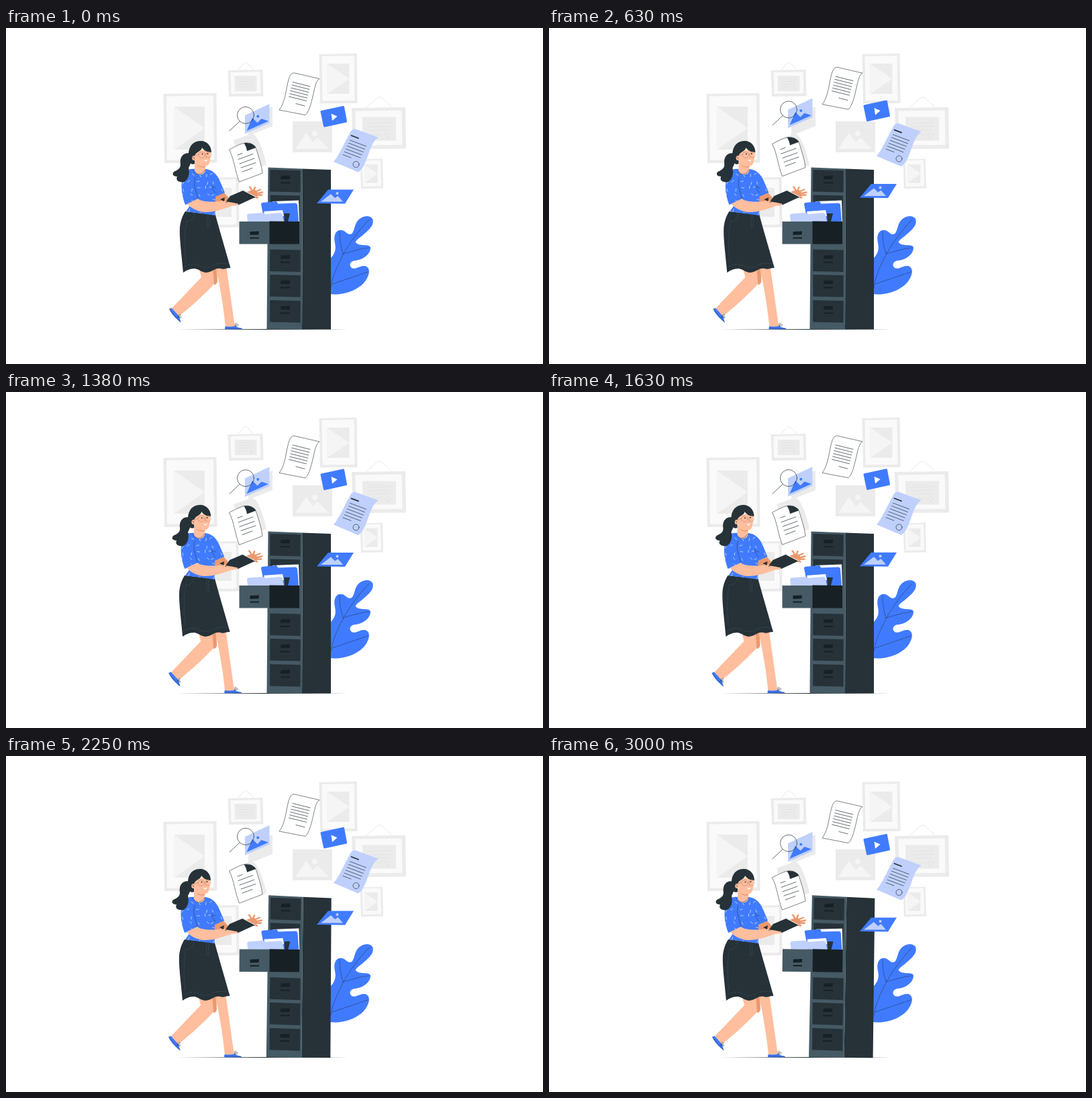
Write an HTML page that moves like this. It is 800 px wide and 500 px high and loops after 3040 ms.

```html
<!DOCTYPE html>
<html lang="en">
<head>
<meta charset="utf-8">
<title>Filing documents</title>
<style>
html, body { margin: 0; width: 100%; height: 100%; overflow: hidden; background: #fff; }
svg { display: block; width: 800px; height: 500px; }
.blue { fill: #407bff; }
.pale { fill: #bfd0fc; }
.dark { fill: #263238; }
.slate { fill: #455a64; }
.black { fill: #172025; }
.skin { fill: #ffbe9d; }
.tan { fill: #eb996e; }
.g1 { fill: #ebebeb; }
.g2 { fill: #f5f5f5; }
.g3 { fill: #fafafa; }
.white { fill: #fff; }
.line { fill: none; stroke: #263238; stroke-width: .7; stroke-linecap: round; stroke-linejoin: round; }
.thin { stroke-width: .5; }
.bold { stroke-width: 1.8; }
.faint { stroke: #e0e0e0; }
.soft { stroke: #455a64; stroke-width: .5; }
.sheet { fill: #fff; stroke: #263238; stroke-width: .6; stroke-linejoin: round; }
</style>
</head>
<body>
<svg viewBox="0 0 800 500">
  <defs>
    <clipPath id="shirtClip"><path d="M271 211C278 208 286 211 298 210C308 211 314 218 318 226L326 245L312 251L312 279L268 273L277 260L267 263C261 247 257 224 271 211Z"/></clipPath>
  </defs>

  <g id="wall"></g>
  <g>
    <path class="line faint" d="M346 62L353 54Q357 49 361 54L368 61M537 118Q545 112 553 104Q557 101 562 106L574 117"/>
    <path class="line faint" d="M346 76L368 75.5M346 80L368 79.5M348 84L366 83.5M346 88L358 87.5M539 142L573 141M539 147L573 146M543 152L569 151M539 159L558 158.5"/>
    <circle class="line faint" cx="365.5" cy="88.5" r="2"/>
    <circle class="line faint" cx="568.5" cy="159.5" r="3.5"/>
    <path class="g1" d="M427 139H486V185H427Z"/>
    <path class="g2" d="M431 180L447 156L457 170L464 163L481 180Z"/>
    <circle class="g2" cx="460" cy="157" r="4"/>
    <path class="g1" d="M361 133L397 117V146L361 160Z"/>
    <path class="g1" d="M339 167L367 157C375 160 383 181 388 204L354 216Z"/>
  </g>

  <path class="dark" d="M237 448.5L388 448.1L540 448.5L388 448.9Z"/>

  <path class="blue" d="M483 396C505 399 529 388 537 374C543 364 542 355 534 354C526 354 521 360 515 357C510 353 513 346 521 346C531 345 543 337 543 327C542 321 531 325 523 321C517 318 525 314 533 307C543 299 549 292 546 284C541 277 529 280 523 288C518 296 519 307 512 307C507 307 505 299 496 301C490 303 488 311 490 320C492 330 490 336 483 343Z"/>
  <path class="line thin" d="M484 386C487 364 505 322 541 285M497 303C497 316 499 326 502 336M502 336C514 333 528 328 541 327M486 381L539 363"/>

  <g id="cabinet">
    <path class="slate" d="M390.500 207.500L442 209.500L441 448.500H388.500Z"/>
    <path class="dark" d="M442 209.500L484 211V448.500H441Z"/>
    <path class="dark" d="M393.500 248.500L438 249.500L437 290H393.500Z"/>
    <path class="white" d="M397 258L436 256.500L437 288H397Z"/>
    <path class="blue" d="M380 262Q380 260.500 382 260L402 258Q404 258 405 261.500L431 260.500Q433.500 260.500 434 263L436 288H385Z"/>
    <path class="white" d="M384 273L412 271L414 280L386 280Z"/>
    <path class="dark" d="M414 276H423L420 288H415Z"/>
    <path class="pale" d="M359 279Q359 277 361 276.500L382 275Q384 275 386 277L408 275Q411 275 412 278L414 288H360Z"/>
    <g id="drawers"></g>
    <path class="slate" d="M347.500 288H393V321.500H347.500Z"/>
    <path class="black" d="M392.500 287.500L437 288V321.500H392.500Z"/>
    <path class="black" d="M363.500 303L377 302.500L376.500 307.500L363.500 308ZM363.500 311.500H377V313.500H363.500Z"/>
  </g>

  <g id="papers">
    <path class="sheet" d="M407 122C416 111 417 91 421 77C423 70 426 66 430 67L467 75.500C463 78 461 84 459 93C455 111 452 124 446 129.500Z"/>
    <g id="textA"></g>

    <path class="pale" d="M356 130L392.500 113V141.500L356 157.500Z"/>
    <path class="blue" d="M358.500 153L367 133.500L374.500 141L380.500 135L391 138.500Z"/>
    <circle class="blue" cx="375.300" cy="131.500" r="2"/>
    <circle class="line" cx="357" cy="129.800" r="12.500"/>
    <path class="line" d="M348 139L333 153"/>

    <path class="blue" stroke="#407bff" stroke-width="3" stroke-linejoin="round" d="M470 124.500L502.500 117.500L506.500 139L474.500 146Z"/>
    <path class="white" d="M484.500 127.500L493.500 131.500L486 138Z"/>

    <path class="pale" d="M488 199C498 187 503 172 511 159C514 152 517 149.500 521 150.500L555 163C549 166 546 172 542 182C536 199 532 211 524.500 214.500Z"/>
    <path class="line bold" d="M514.500 160L525 164"/>
    <g id="textB"></g>
    <circle class="line" cx="521.500" cy="203" r="4.500"/>

    <path class="sheet" d="M332.500 181C342 176 350 172 356 171C364 170 371 174 373.500 182C377 194 381 205 382 216L347.500 229C341 213 340 195 332.500 181Z"/>
    <path class="dark" d="M354.500 171.500C362 170 370 173 372.500 178L359 183Q358 176 354.500 171.500Z"/>
    <path class="line" d="M345 189L352 186.500M346 195.500L368 187.500M348 202L370 194M350 208L372 200.500M352 214L367 208.500"/>

    <path class="blue" d="M463 261L480 240.500H518L505 261.500Z"/>
    <path class="pale" d="M469 258.500L484 247L490 253L494.500 250L502 258.500Z"/>
    <circle class="pale" cx="493.500" cy="246" r="2"/>
  </g>

  <g id="woman">
    <path class="skin" d="M287 355L291 371L246 418L257 429C275 416 300 392 312 379L315 355Z"/>
    <path class="tan" d="M308 355L310 382Q314 382 315 377L314 355Z"/>
    <path class="skin" d="M312 355C317 375 324 412 327 445H341L328 353Z"/>
    <path class="blue" d="M243 418L246.500 416.500L258 429L260.500 438.500C252 432 246 425 243 418Z"/>
    <path class="blue" d="M326.500 444Q334 445 341 443.500Q346 446 352 447L351 448.300H326Z"/>
    <path class="line thin" d="M244 419Q250 427 260 437M327 446.500L351 447.300"/>
    <path class="line thin" d="M256 430C256 426 261 425 260 428L256 430C260 429 263 431 260 431.500ZM341.500 444C340 439 343 438 343.500 440L341.500 444C344 440 347 440 346 442.500Z"/>

    <path class="tan" d="M310 249L325 245L332 253L330 261L310 262Z"/>
    <path class="tan" d="M354 246L361 243L370 240L375 245L374 252L362 254Z"/>
    <path fill="none" stroke="#eb996e" stroke-width="2.400" stroke-linecap="round" d="M367 246Q366 239 363 236.500M369 242L371 237M370 244L379 240.500M371 247L382 244.500M371 249L381 248.500M369 251L375 252.500"/>

    <path class="dark" d="M267 273L312 278C317 297 327 330 334.500 357C328 357 325 360 320 358C312 356 308 363 298 364C290 363 288 359 281 358C274 358 268 361 264 364C262 340 258 312 259 297C260 287 263 279 267 273Z"/>
    <path class="line soft" d="M299 278Q300 289 300 297L303 297Q303 287 302 279M281 277Q279 286 270 288" stroke-dasharray="3 2"/>
    <path class="line soft" stroke-dasharray="3 2" d="M266 355Q280 348 291 355Q302 359 311 352Q322 349 331 351M269 287Q264 310 268 348"/>

    <path class="blue" d="M271 211C278 208 286 211 298 210C308 211 314 218 318 226L326 245L312 251L312 279L268 273L277 260L267 263C261 247 257 224 271 211Z"/>
    <g id="dashes" clip-path="url(#shirtClip)" stroke="#d7e3ff" stroke-width=".8" stroke-linecap="round"></g>
    <path class="line thin" d="M282 222C278 233 284 243 286 254M307 235Q309 243 313 246M313 238Q310 238 307 235"/>

    <path class="skin" d="M270 261.500L286 254C293 260 312 259 327 257L347 261C346 265 340 264 336 265C325 269 308 275 295 274C285 273 275 268 270 261.500Z"/>
    <path class="dark" d="M319 255L326 252L325 258Z"/>
    <path class="dark" d="M327 259.500L334 250L354 241.500L372 251.500L347 263Z"/>
    <path fill="none" stroke="#fff" d="M353 241.500L372.500 251.500"/>
    <path class="skin" d="M326 258Q336 259 346 261.500Q346 265 338 264Z"/>

    <path class="dark" d="M275 187C265 184 258 192 260 203C260 210 254 212 250 214C246 219 251 221 255 221C252 227 258 230 265 229C272 226 274 216 272 208C276 201 278 194 275 187Z"/>
    <path class="skin" d="M281 198V213C285 220 294 220 297 213V204Z"/>
    <path class="tan" d="M284 203Q290 208 297 205V207Q289 209 284 203Z"/>
    <path class="skin" d="M280 184L304 180C305 190 305 199 301 204C297 207 287 205 283 201Z"/>
    <path class="dark" d="M273 198C269 179 277 168 290 168C300 168 306 176 306 185C299 185 295 182 292 178C291 184 284 183 281 190L281 202C278 204 274 202 273 198Z"/>
    <ellipse class="skin" cx="280" cy="193.500" rx="2.800" ry="3.500"/>
    <path class="line thin" d="M278.500 192Q281 192 280.500 195"/>
    <g fill="none" stroke="#b78572" stroke-width=".6">
      <circle cx="291.500" cy="189" r="4.500"/>
      <ellipse cx="302" cy="188.500" rx="3.800" ry="4.500"/>
      <path d="M296 188L298 187.500M287 188L281 191"/>
    </g>
    <circle class="dark" cx="292.500" cy="187.500" r=".9"/>
    <circle class="dark" cx="300.500" cy="187" r=".9"/>
    <path fill="none" stroke="#eb996e" stroke-width=".7" d="M297 187L299 193H296.500"/>
    <path class="white" d="M294.500 196Q298 197.500 300.500 195.500Q299.500 199 297 198.500Z"/>
    <path class="line thin" d="M278 211Q288 225 297 211"/>
  </g>
</svg>
<script>
const $ = id => document.getElementById(id);
const poly = (cls, pts) => `<polygon class="${cls}" points="${pts}"/>`;
const rule = (x, y, dx, dy, cls = 'class="line"') =>
  `<line ${cls} x1="${x}" y1="${y}" x2="${x + dx}" y2="${y + dy}"/>`;

// Wall frames: outer box, border width, inner picture box, play triangle.
const frame = (x, y, r, b, w, px, py, pr, pb, play) =>
  poly('g1', [x, y + 1, r - 1, y, r, b - .5, x + 1.5, b]) +
  poly('g3', [x + w, y + w, r - w - 1, y + w - 1, r - w, b - w - .5, x + w + 1, b - w]) +
  poly('g1', [px, py, pr, py, pr, pb, px + .5, pb]) +
  (play ? poly('g2', [px, py, pr, (py + pb) / 2, px + .5, pb]) : '');
$('wall').innerHTML =
  frame(234.5, 97, 314.5, 201, 4.5, 250, 117, 296, 181, true) +
  frame(330.5, 62, 383.5, 102, 4, 340.5, 71, 373.5, 94) +
  frame(466.5, 38, 523.5, 112.5, 4, 478, 53, 511.5, 98, true) +
  frame(515, 118, 596, 180, 5.5, 531, 132.5, 581, 167.5) +
  frame(527.5, 194.5, 562, 239, 3, 534, 203, 553.5, 230.5, true) +
  frame(300, 222, 347.5, 297, 4, 312, 238, 336, 281);

$('drawers').innerHTML = [211, 329.5, 367, 405].map(y =>
  poly('dark', [393.3, y, 438.7, y + 1, 438.5, y + 33.5, 393.2, y + 32.5]) +
  poly('black', [409.5, y + 9, 423, y + 8.5, 422.5, y + 14, 409, y + 14]) +
  poly('black', [409, y + 18.3, 423, y + 18.3, 423, y + 20.3, 409, y + 20.3])).join('');

let textA = rule(432, 112.5, 13, 3.5), textB = '';
for (let i = 0; i < 6; i++) {
  const last = i === 5;
  textA += rule(427 - i * 1.1, 80.5 + i * 4.3, 26, 6.5);
  textB += rule(512.5 - i * 2.1, 167 + i * 4.3, last ? 12 : 24, last ? 4.5 : 9);
}
$('textA').innerHTML = textA;
$('textB').innerHTML = textB;

let seed = 7;
const rand = () => (seed = seed * 16807 % 2147483647) / 2147483647;
let dashes = '';
for (let y = 214; y < 280; y += 10)
  for (let x = 262; x < 328; x += 11) {
    const a = rand() * Math.PI;
    dashes += rule(x + rand() * 6, y + rand() * 6, 3.6 * Math.cos(a), 3.6 * Math.sin(a), '');
  }
$('dashes').innerHTML = dashes;

// Linear interpolation through evenly spaced stops.
const along = (stops, p) => {
  const s = p * (stops.length - 1), i = Math.min(Math.floor(s), stops.length - 2);
  return stops[i] + (stops[i + 1] - stops[i]) * (s - i);
};
const shake = [0, -1, 2, -4, 4, -4, 4, -4, 2, -1, 0];
const sway = [0, 1, 0, -1, 0];
const LOOP = 3040, CYCLE = 3000, SWAY_DELAY = 2000;

function draw() {
  const t = performance.now() % LOOP;
  const lift = along([0, -10, 0], (t % 1500) / 1500);
  const shift = along(shake, (t % CYCLE) / CYCLE);
  const tilt = along(sway, Math.max(0, t - SWAY_DELAY) / CYCLE);
  $('papers').setAttribute('transform', `translate(0 ${lift})`);
  $('woman').setAttribute('transform', `translate(${shift} 0)`);
  $('cabinet').setAttribute('transform', `rotate(${tilt} 416 328)`);
  requestAnimationFrame(draw);
}
draw();
</script>
</body>
</html>
```
